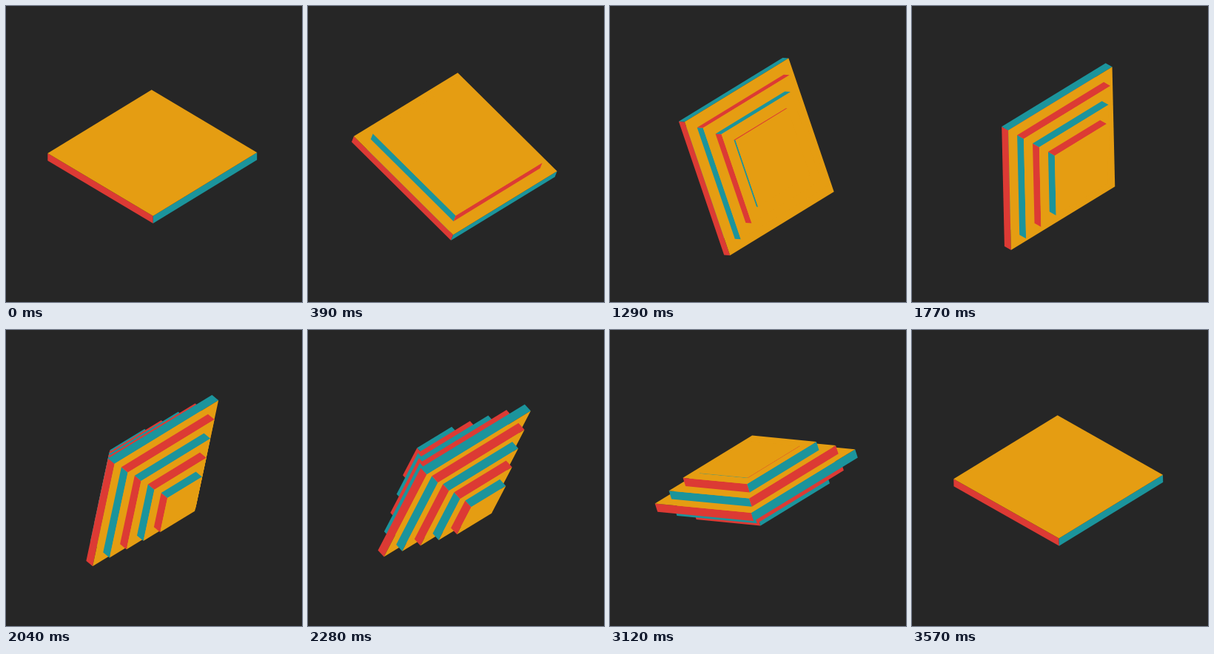
These frames come from a looping animation (400 by 400 pixels, 3.6 s). An HTML page with a canvas:

```html
<!DOCTYPE html>
<html lang="en">
<head>
<meta charset="utf-8">
<title>Turning stack</title>
<style>
html, body { margin: 0; width: 100%; height: 100%; overflow: hidden; background: #262626; }
canvas { display: block; }
</style>
</head>
<body>
<canvas id="stage" width="400" height="400"></canvas>
<script>
const ctx = document.getElementById('stage').getContext('2d');
const LOOP = 3600, STEP = 30;
const CENTER = [197.75, 203.5];
const SIDE = 200, INSET = SIDE / 12, THICK = 12.5, LEVELS = 4;
const ORANGE = '#e59d12', RED = '#dc3a34', TEAL = '#1b949c';

// Unit axes in view space: x right, y down, z toward the viewer.
const sinTilt = 0.603, cosTilt = Math.sqrt(1 - sinTilt ** 2);
const yaw = 45.4 * Math.PI / 180, sinYaw = Math.sin(yaw), cosYaw = Math.cos(yaw);
const axle = [cosYaw, -sinYaw * sinTilt, -sinYaw * cosTilt];
const across = [sinYaw, cosYaw * sinTilt, cosYaw * cosTilt];
const down = [0, cosTilt, -sinTilt];

const clamp = x => Math.min(1, Math.max(0, x));
const smooth = x => x * x * (3 - 2 * x);
const mix = (p, q, i, j) => p.map((c, k) => c * i + q[k] * j);

// Number of levels pushed out on each side: four pops, then one steady return.
function extension(ms) {
  if (ms >= 2700) return LEVELS * (1 - clamp((ms - 2700) / 860));
  let sum = 0;
  for (let k = 0; k < LEVELS; k++) sum += smooth(clamp((ms - 600 * k) / 270));
  return sum;
}

function fillFace(points, color) {
  ctx.fillStyle = color;
  ctx.beginPath();
  for (const [x, y] of points) ctx.lineTo(x, y);
  ctx.closePath();
  ctx.fill();
}

// A square box between heights low and high; only faces turned to the viewer are drawn.
function drawBox(b, n, half, low, high, colorA, colorB) {
  const point = (i, j, h) => [0, 1].map(k =>
    CENTER[k] + half * (axle[k] * i + b[k] * j) + n[k] * h);

  const sa = axle[2] > 0 ? 1 : -1;
  const sb = b[2] > 0 ? 1 : -1;
  const cap = n[2] > 0 ? high : low;

  fillFace([point(sa, -1, low), point(sa, 1, low), point(sa, 1, high), point(sa, -1, high)], colorA);
  fillFace([point(-1, sb, low), point(1, sb, low), point(1, sb, high), point(-1, sb, high)], colorB);
  fillFace([point(-1, -1, cap), point(1, -1, cap), point(1, 1, cap), point(-1, 1, cap)], ORANGE);
}

function draw(ms) {
  const angle = Math.PI * ms / LOOP;
  const c = Math.cos(angle), s = Math.sin(angle);
  const b = mix(across, down, c, s);
  const n = mix(across, down, s, -c);
  const out = extension(ms);
  const facing = n[2] > 0 ? 1 : -1;

  ctx.fillStyle = '#262626';
  ctx.fillRect(0, 0, 400, 400);

  for (let i = -LEVELS; i <= LEVELS; i++) {
    const level = Math.abs(i), sign = Math.sign(i * facing);
    const inner = THICK * (0.5 + Math.min(out, level - 1));
    const outer = THICK * (0.5 + Math.min(out, level));
    if (level && outer - inner < 0.01) continue;
    const ends = level ? [sign * inner, sign * outer] : [-THICK / 2, THICK / 2];
    const colors = level % 2 ? [TEAL, RED] : [RED, TEAL];
    drawBox(b, n, SIDE / 2 - INSET * level, Math.min(...ends), Math.max(...ends), ...colors);
  }
}

let start;
function tick(now) {
  if (start === undefined) start = now;
  const ms = (now - start) % LOOP;
  draw(Math.floor(ms / STEP + 0.01) * STEP);
  requestAnimationFrame(tick);
}
draw(0);
requestAnimationFrame(tick);
</script>
</body>
</html>
```
